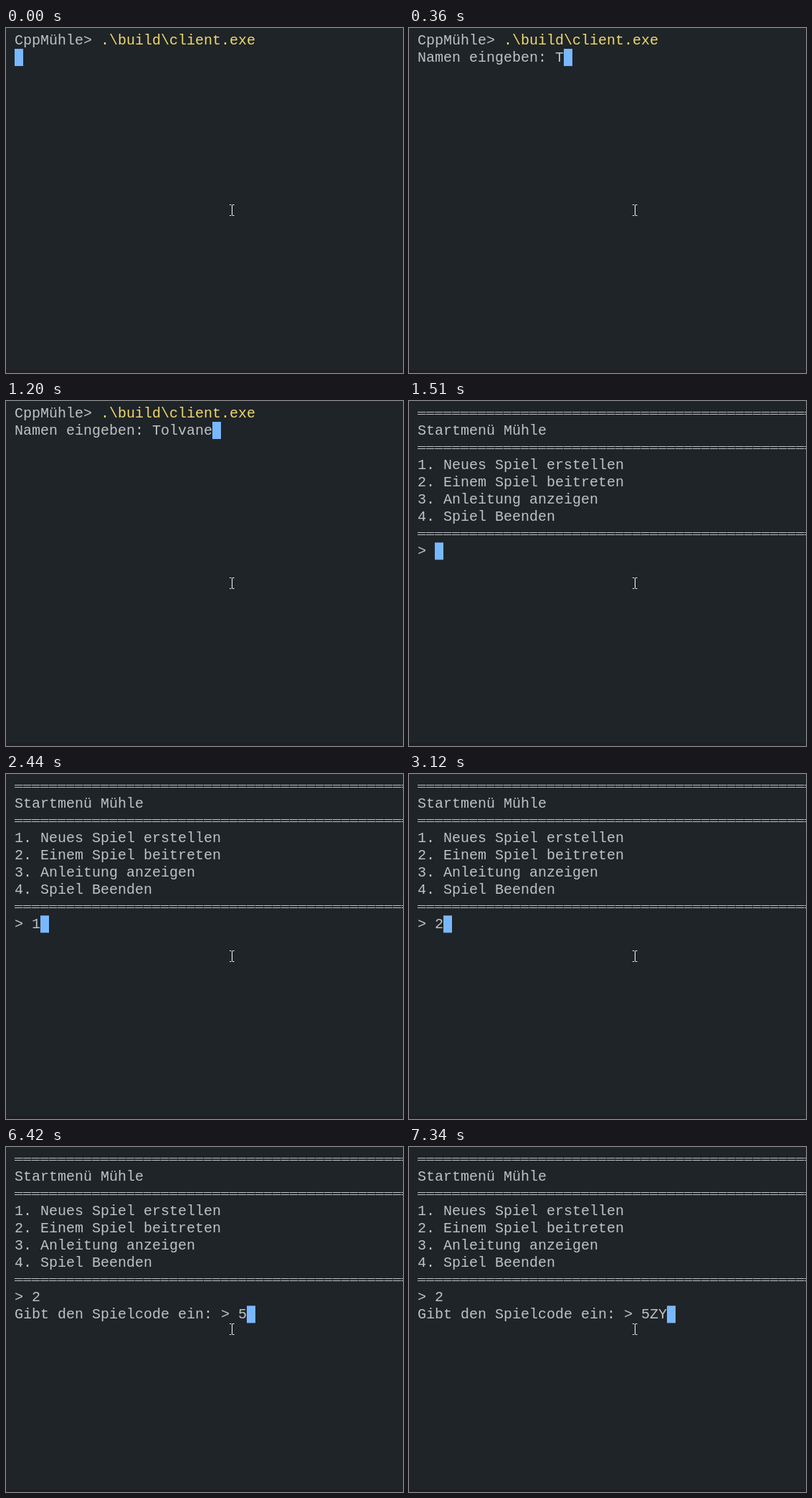
Recreate the animation shown at these times as an HTML page. Size 554x481 px, loop 8000 ms.

```html
<!DOCTYPE html>
<html lang="de">
<head>
<meta charset="utf-8">
<title>Terminal</title>
<style>
  html, body { margin: 0; width: 100%; height: 100%; overflow: hidden; background: #1f2428; }
  svg { display: block; width: 554px; height: 481px; }
  text {
    font: 20px "Courier New", "Liberation Mono", monospace;
    fill: #bfc2c5;
    white-space: pre;
  }
  .cmd { fill: #f0d96c; }
  .rule { fill: none; stroke: #bfc2c5; stroke-dasharray: 11.4 .6; }
</style>
</head>
<body>
<svg viewBox="0 0 554 481">
  <rect width="554" height="481" fill="#1f2428"/>
  <rect y="477" width="554" height="4" fill="#1f1e23"/>
  <g id="rows"></g>
  <rect id="cursor" width="12" height="24" fill="#79b8ff"/>
  <path d="M312 246.5h2.5M316 246.5h2.5M315.5 247v14M312 261.5h2.5M316 261.5h2.5" fill="none" stroke="#fff"/>
</svg>
<script>
const LOOP = 8000, LEFT = 12, TOP = 5, CELL = 12, LINE = 24.04, ROWS = 10;
const RULE = "=";
const MENU = [
  RULE, "Startmenü Mühle", RULE,
  "1. Neues Spiel erstellen",
  "2. Einem Spiel beitreten",
  "3. Anleitung anzeigen",
  "4. Spiel Beenden",
  RULE
];
const NAME = "Tolvane", CODE = "5ZY";
const NAME_KEYS = [360, 670, 790, 840, 960, 1140, 1200];
const CODE_KEYS = [6420, 7100, 7340];

const rowBox = document.getElementById("rows");
const cursor = document.getElementById("cursor");

function add(parent, tag, attrs) {
  const el = document.createElementNS("http://www.w3.org/2000/svg", tag);
  for (const key in attrs) el.setAttribute(key, attrs[key]);
  return parent.appendChild(el);
}

const rows = Array.from({ length: ROWS }, (_, i) => {
  const top = Math.round(TOP + LINE * i);
  const text = add(rowBox, "text", { x: LEFT, y: top + 18 });
  return {
    plain: add(text, "tspan"),
    cmd: add(text, "tspan", { class: "cmd" }),
    rule: add(rowBox, "path", { class: "rule", d: `M${LEFT} ${top + 10.5}H554M${LEFT} ${top + 13.5}H554` })
  };
});

const typed = (text, keys, t) => text.slice(0, keys.filter(k => k <= t).length);

function screen(t) {
  if (t < 1510) {
    const input = t < 60 ? "" : "Namen eingeben: " + typed(NAME, NAME_KEYS, t);
    return { lines: ["CppMühle> ", input], cmd: ".\\build\\client.exe", col: input.length };
  }
  const choice = t < 2440 ? "" : t < 3000 ? "1" : t < 3120 ? "" : "2";
  const lines = [...MENU, "> " + choice];
  if (t < 3800) return { lines, cmd: "", col: 2 + choice.length };

  // The two-cell blank is overwritten by the typed code.
  const ask = "Gibt den Spielcode ein: > ";
  const code = typed(CODE, CODE_KEYS, t);
  lines.push(ask + code.padEnd(2, "_"));
  return { lines, cmd: "", col: ask.length + code.length };
}

function draw(t) {
  const { lines, cmd, col } = screen(t);
  rows.forEach((row, i) => {
    const line = lines[i] || "", isRule = line === RULE;
    row.plain.textContent = isRule ? "" : line;
    row.cmd.textContent = i ? "" : cmd;
    row.rule.setAttribute("visibility", isRule ? "visible" : "hidden");
  });
  cursor.setAttribute("x", LEFT + CELL * col);
  cursor.setAttribute("y", TOP + LINE * (lines.length - 1));
}

const start = performance.now();
function tick() {
  draw((performance.now() - start) % LOOP);
  requestAnimationFrame(tick);
}
tick();
</script>
</body>
</html>
```
